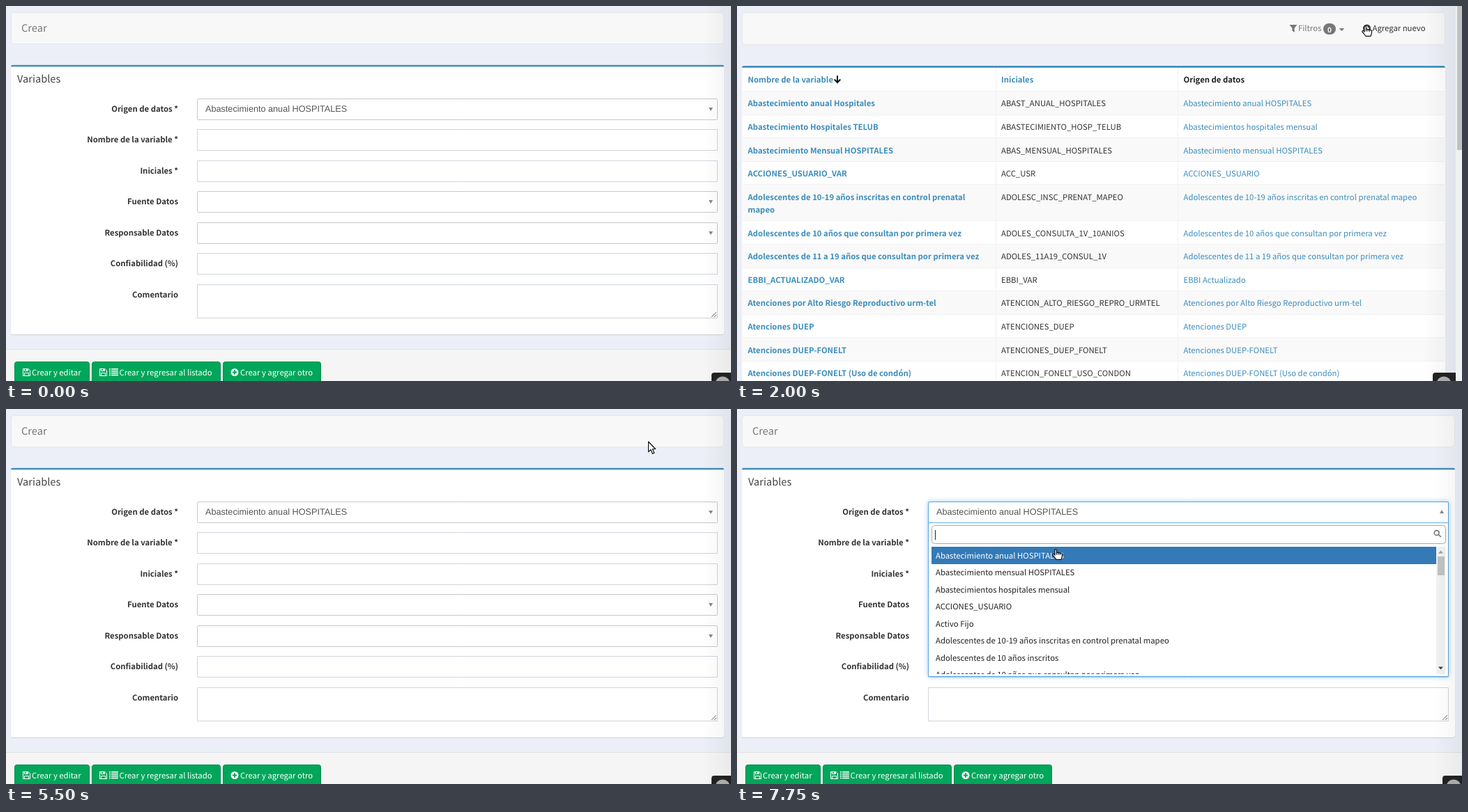
An HTML page with a canvas for the animation above (8 s loop, 1040 by 539 pixels).

```html
<!DOCTYPE html>
<html lang="es">
<head>
<meta charset="utf-8">
<title>Variables</title>
<style>
html, body { margin: 0; width: 100%; height: 100%; overflow: hidden; background: #eceff7; }
canvas { display: block; width: 100vw; height: 100vh; }
</style>
</head>
<body>
<canvas id="stage" width="1040" height="539"></canvas>
<script>
const ctx = document.getElementById('stage').getContext('2d');
const LOOP = 8000;
const SANS = '"Noto Sans CJK JP", "Noto Sans CJK SC", "Noto Sans CJK", "Open Sans", sans-serif';
const BODY = `11.33px ${SANS}`;
const BOLD = `bold ${BODY}`;
const HEAD = `14.6px ${SANS}`;
const FIELD = '12.66px "Liberation Sans", Arial, sans-serif';
const BLUE = '#3c8dbc', LINE = '#f1f1f2', GREY = '#777', INK = '#333';

const ROWS = [
  ['Abastecimiento anual Hospitales', 'ABAST_ANUAL_HOSPITALES', 'Abastecimiento anual HOSPITALES'],
  ['Abastecimiento Hospitales TELUB', 'ABASTECIMIENTO_HOSP_TELUB', 'Abastecimientos hospitales mensual'],
  ['Abastecimiento Mensual HOSPITALES', 'ABAS_MENSUAL_HOSPITALES', 'Abastecimiento mensual HOSPITALES'],
  ['ACCIONES_USUARIO_VAR', 'ACC_USR', 'ACCIONES_USUARIO'],
  ['Adolescentes de 10-19 años inscritas en control prenatal|mapeo', 'ADOLESC_INSC_PRENAT_MAPEO',
    'Adolescentes de 10-19 años inscritas en control prenatal mapeo'],
  ['Adolescentes de 10 años que consultan por primera vez', 'ADOLES_CONSULTA_1V_10ANIOS',
    'Adolescentes de 10 años que consultan por primera vez'],
  ['Adolescentes de 11 a 19 años que consultan por primera vez', 'ADOLES_11A19_CONSUL_1V',
    'Adolescentes de 11 a 19 años que consultan por primera vez'],
  ['EBBI_ACTUALIZADO_VAR', 'EBBI_VAR', 'EBBI Actualizado'],
  ['Atenciones por Alto Riesgo Reproductivo urm-tel', 'ATENCION_ALTO_RIESGO_REPRO_URMTEL',
    'Atenciones por Alto Riesgo Reproductivo urm-tel'],
  ['Atenciones DUEP', 'ATENCIONES_DUEP', 'Atenciones DUEP'],
  ['Atenciones DUEP-FONELT', 'ATENCIONES_DUEP_FONELT', 'Atenciones DUEP-FONELT'],
  ['Atenciones DUEP-FONELT (Uso de condón)', 'ATENCION_FONELT_USO_CONDON',
    'Atenciones DUEP-FONELT (Uso de condón)']
];
const LABELS = ['Origen de datos *', 'Nombre de la variable *', 'Iniciales *', 'Fuente Datos',
  'Responsable Datos', 'Confiabilidad (%)', 'Comentario'];
const SELECTS = [0, 3, 4];
const OPTIONS = ['Abastecimiento anual HOSPITALES', 'Abastecimiento mensual HOSPITALES',
  'Abastecimientos hospitales mensual', 'ACCIONES_USUARIO', 'Activo Fijo',
  'Adolescentes de 10-19 años inscritas en control prenatal mapeo',
  'Adolescentes de 10 años inscritos', 'Adolescentes de 10 años que consultan por primera vez'];

// start time, shape, left, top
const POINTER = [
  [1250, arrow, 18, 146], [1500, arrow, 645, 55], [1750, arrow, 878, 34],
  [2000, hand, 896, 28], [2250, hand, 952, 21], [2500, hand, 941, 30],
  [3250, arrow, 946, 30], [5500, arrow, 921, 46], [5750, beam, 674, 178],
  [6000, arrow, 621, 165], [6250, hand, 513, 143], [6750, arrow, 517, 143],
  [7000, beam, 505, 165], [7250, beam, 487, 179], [7500, beam, 470, 187],
  [7750, hand, 452, 201]
];

function fill(x, y, w, h, color) {
  ctx.fillStyle = color;
  ctx.fillRect(x, y, w, h);
}

function box(x, y, w, h, r, color, border) {
  ctx.beginPath();
  ctx.roundRect(x + .5, y + .5, w - 1, h - 1, r);
  if (color) { ctx.fillStyle = color; ctx.fill(); }
  if (border) { ctx.strokeStyle = border; ctx.lineWidth = 1; ctx.stroke(); }
}

function text(str, x, y, font, color, align = 'left') {
  ctx.font = font;
  ctx.fillStyle = color;
  ctx.textAlign = align;
  ctx.fillText(str, x, y);
}

function poly(points, color) {
  ctx.beginPath();
  points.forEach(([x, y]) => ctx.lineTo(x, y));
  ctx.closePath();
  ctx.fillStyle = color;
  ctx.fill();
}

function disc(x, y, r, color) {
  ctx.beginPath();
  ctx.arc(x, y, r, 0, Math.PI * 2);
  ctx.fillStyle = color;
  ctx.fill();
}

// small triangle centred on x; a negative h points up
function triangle(x, y, w, h, color) {
  poly([[x - w / 2, y - h / 2], [x + w / 2, y - h / 2], [x, y + h / 2]], color);
}

function plusIcon(x, y, color, cross) {
  disc(x, y, 5.5, color);
  fill(x - 3.2, y - 1, 6.4, 2, cross);
  fill(x - 1, y - 3.2, 2, 6.4, cross);
}

function floppyIcon(x, y) {
  ctx.strokeStyle = '#fff';
  ctx.lineWidth = 1;
  ctx.beginPath();
  ctx.moveTo(x + .5, y + .5);
  ctx.lineTo(x + 8, y + .5);
  ctx.lineTo(x + 10.5, y + 3);
  ctx.lineTo(x + 10.5, y + 10.5);
  ctx.lineTo(x + .5, y + 10.5);
  ctx.closePath();
  ctx.rect(x + 2.5, y + 6.5, 6, 4);
  ctx.rect(x + 2.5, y + .5, 5, 3);
  ctx.stroke();
  fill(x + 5, y + 1, 2, 2, '#fff');
}

function listIcon(x, y) {
  for (let i = 0; i < 4; i++) {
    fill(x, y + i * 2.9, 2, 1.6, '#fff');
    fill(x + 3, y + i * 2.9, 10, 1.6, '#fff');
  }
}

function panel(y, right, height) {
  box(7, y, right - 7, height, 4, '#f8f8f8', '#e6e6e8');
}

function card(y, right, bottom) {
  ctx.save();
  ctx.shadowColor = 'rgba(0,0,0,.12)';
  ctx.shadowOffsetY = 1;
  ctx.shadowBlur = 1;
  ctx.beginPath();
  ctx.roundRect(7, y, right - 7, bottom - y, 3);
  ctx.fillStyle = '#fff';
  ctx.fill();
  ctx.restore();
  ctx.save();
  ctx.clip();
  fill(7, y, right - 7, 2.7, BLUE);
  ctx.restore();
}

// soft shade along the right side and the corner badge
function edge(width) {
  const shade = ctx.createLinearGradient(width - 46, 0, width, 0);
  shade.addColorStop(0, 'rgba(0,0,0,0)');
  shade.addColorStop(1, 'rgba(0,0,0,.05)');
  fill(width - 46, 0, 46, 539, shade);
  ctx.save();
  ctx.beginPath();
  ctx.roundRect(width - 33, 527, 33, 30, [4, 0, 0, 0]);
  ctx.fillStyle = '#222';
  ctx.fill();
  ctx.clip();
  disc(width - 17, 543, 10.5, '#aaa');
  ctx.restore();
}

function listPage(t) {
  fill(0, 0, 1040, 539, '#eceff7');
  panel(9, 1016, 47);
  const filterInk = t >= 1750 && t < 2000 ? INK : GREY;
  const addInk = t >= 2000 ? INK : GREY;
  poly([[792.5, 27], [803.5, 27], [799.7, 31.8], [799.7, 38], [796.4, 35.5], [796.4, 31.8]], filterInk);
  text('Filtros', 805, 36, BODY, filterInk);
  ctx.beginPath();
  ctx.roundRect(841, 25, 18, 16, 8);
  ctx.fillStyle = GREY;
  ctx.fill();
  text('0', 850, 37.5, `bold 10px ${SANS}`, '#fff', 'center');
  triangle(867.5, 34, 7.5, 4, filterInk);
  plusIcon(903.5, 32, addInk, '#f8f8f8');
  text('Agregar nuevo', 911.5, 36, BODY, addInk);

  card(86, 1016, 545);
  text('Nombre de la variable', 15.5, 110, BOLD, BLUE);
  text('Iniciales', 379, 110, BOLD, BLUE);
  text('Origen de datos', 640.5, 110, BOLD, '#222');
  fill(143, 100, 2, 9, '#111');
  ctx.strokeStyle = '#111';
  ctx.lineWidth = 2;
  ctx.beginPath();
  ctx.moveTo(139.7, 105.5);
  ctx.lineTo(144, 110);
  ctx.lineTo(148.3, 105.5);
  ctx.stroke();

  let top = 123;
  ROWS.forEach(([name, initials, origin], i) => {
    const lines = name.split('|');
    const height = 33.6 + (lines.length - 1) * 18.3;
    const base = Math.round(top + 21.3);
    if (i % 2 === 0) fill(8, Math.round(top), 1007, Math.round(height), '#f9f9f9');
    fill(8, Math.round(top) - 1, 1007, 1, LINE);
    lines.forEach((line, n) => text(line, 15.5, base + n * 18, BOLD, BLUE));
    text(initials, 379, base, BODY, INK);
    const hover = i === 3 && t >= 1250 && t < 1500;
    text(origin, 640.5, base, BODY, hover ? '#72afd2' : BLUE);
    top += height;
  });
  fill(371, 89, 1, 450, LINE);
  fill(632, 89, 1, 450, LINE);
  edge(1031);
  fill(1031, 0, 9, 539, '#f1f1f1');
  fill(1033, 0, 7, 207, '#c1c1c1');
}

function button(x, w, label, labelX) {
  box(x, 511, w, 34, 3, '#00a65a', '#008d4c');
  text(label, labelX, 531, BODY, '#fff');
}

function formPage(open, caret) {
  fill(0, 0, 1040, 539, '#eceff7');
  panel(9, 1030, 46);
  text('Crear', 22, 37, HEAD, GREY);
  card(84.5, 1030, 472);
  text('Variables', 16, 110, HEAD, '#444');

  LABELS.forEach((label, i) => {
    const y = Math.round(132.6 + i * 44.57);
    const select = SELECTS.includes(i);
    text(label, 247, y + 19, BOLD, INK, 'right');
    box(274, y, 747, i === 6 ? 49 : 31, select ? 1 : 0, '#fff', select ? '#c6c8cc' : '#d0d4dc');
    if (select && !(open && i === 0)) triangle(1011, y + 15.5, 6, 5, '#888');
  });
  ctx.strokeStyle = '#777';
  ctx.lineWidth = 1;
  ctx.beginPath();
  ctx.moveTo(1012, 447);
  ctx.lineTo(1019, 440);
  ctx.moveTo(1016, 447);
  ctx.lineTo(1019, 444);
  ctx.stroke();

  fill(0, 493, 1040, 46, '#f5f5f5');
  fill(0, 493, 1040, 1, '#dfe0e4');
  button(12, 108, 'Crear y editar', 37);
  button(123, 185, 'Crear y regresar al listado', 162.5);
  button(311, 141, 'Crear y agregar otro', 336);
  floppyIcon(24, 521);
  floppyIcon(134, 521);
  listIcon(148, 521);
  plusIcon(328, 526.5, '#fff', '#00a65a');

  if (open) dropdown(caret);
  text(OPTIONS[0], 286, 152, FIELD, '#555');
  edge(1045);
}

function dropdown(caret) {
  ctx.save();
  ctx.shadowColor = 'rgba(102,175,233,.6)';
  ctx.shadowBlur = 6;
  box(274, 133, 747, 252, 2, '#fff', '#5ba6de');
  ctx.restore();
  box(274, 133, 747, 252, 2, '#fff', '#5ba6de');
  fill(275, 163, 745, 1, '#66afe9');
  triangle(1011, 147.5, 6, -5, '#888');

  box(279, 167, 738, 27, 4, '#fff', '#aaa');
  if (caret) fill(284, 174, 1, 14, '#222');
  ctx.strokeStyle = '#777';
  ctx.lineWidth = 1.6;
  ctx.beginPath();
  ctx.arc(1003.7, 178, 3.4, 0, Math.PI * 2);
  ctx.moveTo(1006.3, 180.6);
  ctx.lineTo(1010, 184);
  ctx.stroke();

  ctx.save();
  ctx.beginPath();
  ctx.rect(279, 198, 737, 183);
  ctx.clip();
  fill(279, 198, 724, 25, '#337ab7');
  OPTIONS.forEach((option, i) =>
    text(option, 285, Math.round(214.5 + i * 24.5), BODY, i ? '#222' : '#fff'));
  fill(1003, 198, 13, 183, '#f1f1f1');
  fill(1005, 212, 10, 27, '#c1c1c1');
  triangle(1009.5, 205.5, 7, -4, '#999');
  triangle(1009.5, 372.5, 7, 4, '#444');
  ctx.restore();
}

function outline(path) {
  ctx.fillStyle = '#fff';
  ctx.strokeStyle = '#111';
  ctx.lineWidth = 1.2;
  ctx.lineJoin = 'round';
  ctx.fill(path);
  ctx.stroke(path);
}

function arrow() {
  outline(new Path2D('M.6 1V15.6L4 12.4L6.4 18.2L8.9 17.1L6.4 11.5H10.6Z'));
}

function hand() {
  outline(new Path2D('M4 9V1.8Q4 .6 5.2 .6T6.5 1.8V5.5Q7.8 4.7 9 5.8Q10.4 5 11.5 6.4' +
    'Q13.2 5.8 14.4 7.4V11L13 15.4H6L3.4 12L.8 9Q.6 7 2.6 7.5Z'));
  ctx.stroke(new Path2D('M6.5 5.5V8.5M9 6V8.5M11.5 6.5V8.8'));
}

function beam() {
  const path = new Path2D('M.5 1H2.5L3.5 2L4.5 1H6.5M3.5 2V14M.5 15H2.5L3.5 14L4.5 15H6.5');
  ctx.lineWidth = 1.2;
  ctx.strokeStyle = '#111';
  ctx.stroke(path);
}

function pointer(t) {
  const step = POINTER.findLast(([start]) => t >= start);
  if (!step) return;
  const [, draw, x, y] = step;
  ctx.save();
  ctx.translate(x, y);
  draw();
  ctx.restore();
}

function draw(now) {
  const t = now % LOOP;
  ctx.textRendering = 'geometricPrecision';
  if (t >= 500 && t < 750) {
    fill(0, 0, 1040, 539, '#252c33');
    fill(0, 538, 1040, 1, '#20272d');
  } else if (t >= 750 && t < 4250) {
    listPage(t);
  } else {
    formPage(t >= 6750, t < 7000 || t >= 7750);
  }
  pointer(t);
}

const began = performance.now();
function tick() {
  draw(performance.now() - began);
  requestAnimationFrame(tick);
}
tick();
</script>
</body>
</html>
```
